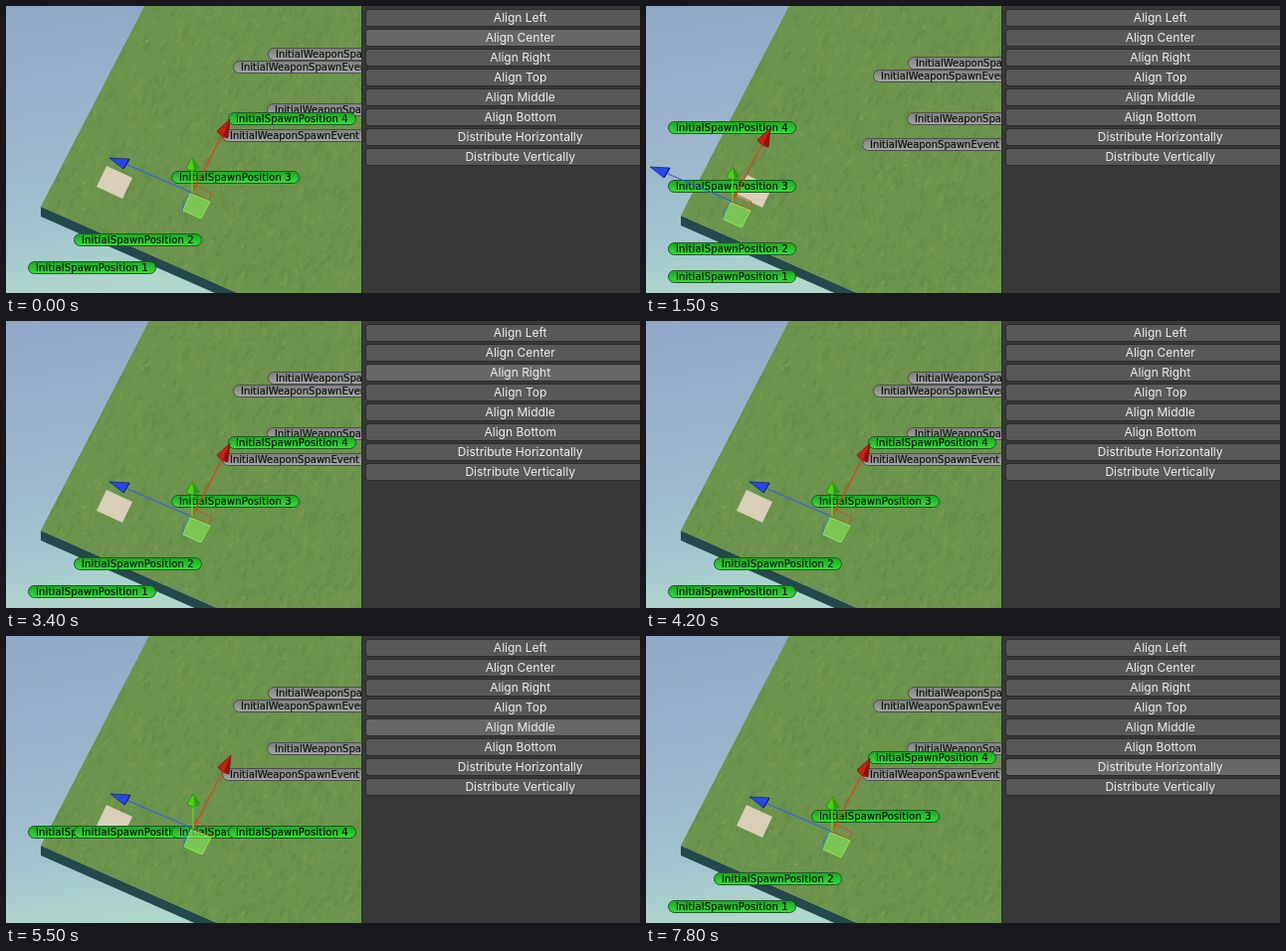
An HTML page that plays this animation: 637x289 px, repeating every 8000 ms.

```html
<!DOCTYPE html>
<html lang="en">
<head>
<meta charset="utf-8">
<title>Align tools</title>
<style>
html, body { margin: 0; width: 100%; height: 100%; overflow: hidden; background: #383838; }
svg { display: block; width: 637px; height: 289px; }
.tag { font: 10px "DejaVu Sans", sans-serif; fill: #0a120a; stroke: #0a120a; stroke-width: .2; }
.spawn { letter-spacing: .15px; }
.button { font: 12px Inter, Roboto, sans-serif; fill: #eee; text-anchor: middle; }
</style>
</head>
<body>
<svg id="stage" viewBox="0 0 637 289" xmlns="http://www.w3.org/2000/svg">
  <defs>
    <linearGradient id="sky" x1="0" y1="0" x2=".2" y2="1">
      <stop offset="0" stop-color="#91a8c8"/>
      <stop offset=".55" stop-color="#9eb8cd"/>
      <stop offset=".8" stop-color="#a3c5cf"/>
      <stop offset="1" stop-color="#b1d6cb"/>
    </linearGradient>
    <linearGradient id="green" x1="0" y1="0" x2="0" y2="1">
      <stop offset="0" stop-color="#18a81f"/>
      <stop offset="1" stop-color="#36de3b"/>
    </linearGradient>
    <linearGradient id="grey" x1="0" y1="0" x2="0" y2="1">
      <stop offset="0" stop-color="#7f7f7f"/>
      <stop offset="1" stop-color="#a6a6a6"/>
    </linearGradient>
    <clipPath id="slab"><path d="M35 211 154-20H380V363Z"/></clipPath>
  </defs>
  <rect width="357" height="289" fill="url(#sky)"/>
  <g id="scene">
    <path d="M35 211V221L380 373V363Z" fill="#25484c"/>
    <g id="grass" clip-path="url(#slab)">
      <rect y="-20" width="380" height="390" fill="#6c944c"/>
    </g>
    <path d="M101 170 127 182 117 203 91 191Z" fill="#dad0ba"/>
    <g id="tags"></g>
    <g id="gizmo" fill="none">
      <path d="M0 0 2-8 19 0 17 8Z" stroke="#d8432a" stroke-width=".9"/>
      <path d="M0 0-9 8-9 18-2 1Z" stroke="#3c6ce6"/>
      <path d="M-2 1 18 9 9 26-9 18Z" fill="#86e85c" fill-opacity=".6" stroke="#86ee4a"/>
      <path d="M0 0-65-28" stroke="#345df0" stroke-width="1.3"/>
      <path d="M0 0 31-60" stroke="#e2401f" stroke-width="1.3"/>
      <path d="M0 0V-23" stroke="#56e01c" stroke-width="1.3"/>
      <g stroke-width=".7" stroke-linejoin="round">
        <path d="M-83-35-63-34-69-24Z" fill="#2448ea" stroke="#142364"/>
        <path d="M-63-34-69-24-66-28Z" fill="#142c9c" stroke="#142364"/>
        <path d="M38-74 25-62Q29-56 36-55Z" fill="#c9200f" stroke="#5c160c"/>
        <path d="M38-74 31-58 36-55Z" fill="#8d1509"/>
        <path d="M0-35-6-25Q0-19 7-25Z" fill="#49d414" stroke="#2a7a14"/>
        <path d="M0-35 2-22 7-25Z" fill="#319c0c"/>
      </g>
    </g>
  </g>
  <rect x="357" width="280" height="289" fill="#383838"/>
  <rect x="357" width="1" height="289" fill="#2e2e2e"/>
  <g id="panel"></g>
</svg>
<script>
const LOOP = 8000;
const byId = id => document.getElementById(id);

function add(parent, name, attrs, text) {
  const node = document.createElementNS("http://www.w3.org/2000/svg", name);
  for (const key in attrs) node.setAttribute(key, attrs[key]);
  if (text) node.textContent = text;
  return parent.appendChild(node);
}

function addTag(text, width, skin, textClass) {
  const group = add(byId("tags"), "g", {});
  add(group, "rect", {
    x: .5, y: -5.5, width: width - 1, height: 12, rx: 6, fill: `url(#${skin})`,
    stroke: skin === "green" ? "#1c5a22" : "#4c4f49"
  });
  add(group, "text", { x: 8, y: 4, class: textClass }, text);
  return group;
}

function place(node, x, y) {
  node.setAttribute("transform", `translate(${x} ${y})`);
}

// Seeded blades of grass, one path per shade
let seed = 7;
function random() {
  seed = (seed * 16807) % 2147483647;
  return seed / 2147483647;
}
function addBlades(count, color, opacity, width, length) {
  let d = "";
  for (let i = 0; i < count; i++) {
    const x = 30 + random() * 330, y = random() * 310 - 10;
    const size = length * (.4 + random());
    d += `M${x.toFixed(1)} ${y.toFixed(1)}l${(size * (random() * .8)).toFixed(1)} ${(-size).toFixed(1)}`;
  }
  add(byId("grass"), "path", { d, fill: "none", stroke: color, opacity, "stroke-width": width });
}
addBlades(450, "#557f43", .25, 4, 9);
addBlades(450, "#84a150", .25, 4, 8);
addBlades(800, "#517d41", .3, 1.2, 5);
addBlades(800, "#90aa58", .3, 1, 4);
addBlades(60, "#b8b268", .45, 1.5, 2);

for (const [x, y] of [[263, 57], [228, 70], [262, 113], [217, 139]])
  place(addTag("InitialWeaponSpawnEvent", 146, "grey", "tag"), x, y);

const home = [[22, 272], [68, 244], [166, 181], [223, 122]];
const spawns = home.map((_, i) => addTag(`InitialSpawnPosition ${i + 1}`, 129, "green", "tag spawn"));

const buttons = ["Align Left", "Align Center", "Align Right", "Align Top", "Align Middle",
  "Align Bottom", "Distribute Horizontally", "Distribute Vertically"].map((label, i) => {
  const y = 3 + i * 20;
  add(byId("panel"), "rect", { x: 361, y, width: 311, height: 18, rx: 3, fill: "#2b2b2b" });
  const face = add(byId("panel"), "rect", { x: 362, y: y + 1, width: 309, height: 16, rx: 2.5 });
  add(byId("panel"), "text", { x: 516.7, y: y + 13.3, class: "button" }, label);
  return face;
});

const layouts = {
  free: { tag: p => p, gizmo: [187, 197] },
  left: { tag: ([, y]) => [22, y], gizmo: [87, 197] },
  center: { tag: ([, y]) => [122.5, y], gizmo: [187, 197] },
  right: { tag: ([, y]) => [223, y], gizmo: [288, 197] },
  top: { tag: ([x]) => [x, 122], gizmo: [188, 120] },
  middle: { tag: ([x]) => [x, 197], gizmo: [188, 194] },
  bottom: { tag: ([x]) => [x, 272], gizmo: [188, 269] },
  spread: { tag: ([, y], i) => [22 + i * 67, y], gizmo: [187, 197] }
};

// Each track lists [start ms, value]
const layoutTrack = [[0, "free"], [500, "left"], [1900, "free"], [2900, "center"], [3400, "free"],
  [3800, "right"], [4200, "free"], [4600, "top"], [5000, "free"], [5500, "middle"],
  [6000, "free"], [6300, "bottom"], [6900, "free"], [7300, "spread"], [7800, "free"]];
const hoverTrack = [[0, 1], [200, -1], [1900, 3], [2100, -1], [3400, 2], [4200, -1], [4600, 3],
  [5000, -1], [5100, 4], [6000, -1], [6300, 5], [6900, -1], [7300, 6]];
const cameraTrack = [[0, -9], [1500, 0]];

const valueAt = (track, t) => track.reduce((value, [start, next]) => t >= start ? next : value, track[0][1]);

function draw(t) {
  const layout = layouts[valueAt(layoutTrack, t)];
  const hover = valueAt(hoverTrack, t);
  place(byId("scene"), 0, valueAt(cameraTrack, t));
  spawns.forEach((tag, i) => place(tag, ...layout.tag(home[i], i)));
  place(byId("gizmo"), ...layout.gizmo);
  buttons.forEach((face, i) => face.setAttribute("fill", i === hover ? "#676767" : "#585858"));
}

const start = performance.now();
function tick() {
  draw((performance.now() - start) % LOOP);
  requestAnimationFrame(tick);
}
draw(0);
requestAnimationFrame(tick);
</script>
</body>
</html>
```
